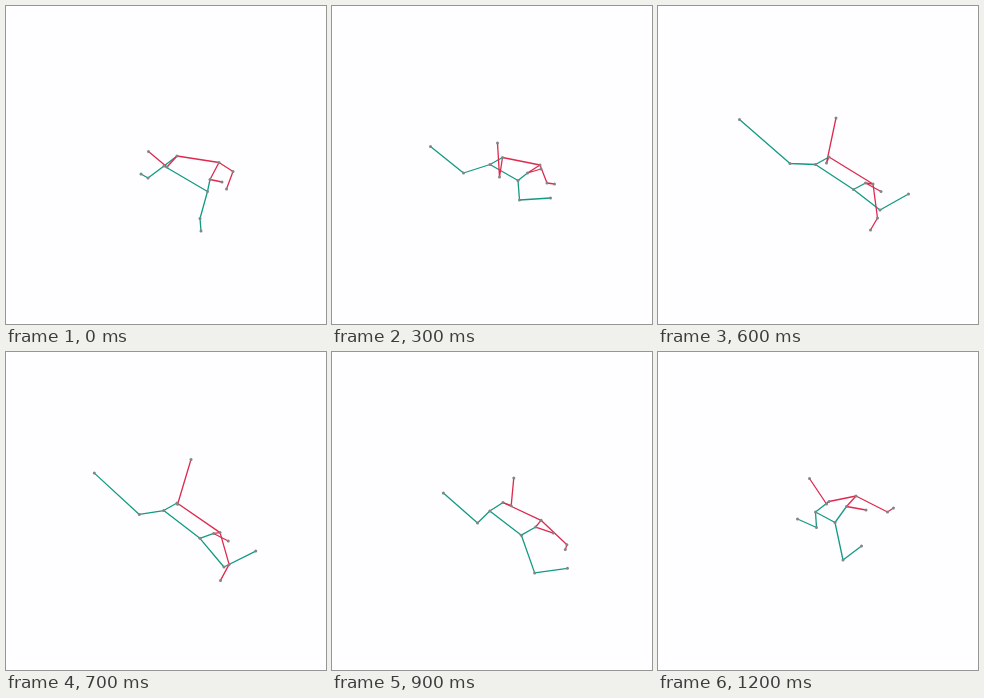
These frames come from a looping animation (320x318 px, 1300 ms). An HTML page with a canvas:

```html
<!DOCTYPE html>
<html>
<head>
<meta charset="utf-8">
<style>
  html, body { margin: 0; width: 100%; height: 100%; overflow: hidden; background: #fefdff; }
  canvas { display: block; }
</style>
</head>
<body>
<canvas width="320" height="318"></canvas>
<script>
const LOOP = 1300, STEP = 100;
const RED = '#de2a4c', GREEN = '#129a82', GRAY = '#858585';
const KEY_TIMES = [0, 300, 500, 600, 800, 1000, 1200];
const ctx = document.querySelector('canvas').getContext('2d');

// Keys are [time, x, y]; an extra key marks a turn between the regular ones.
function path(points, extra) {
  const keys = points.map(([x, y], i) => [KEY_TIMES[i], x, y]);
  if (extra) keys.push(extra);
  return keys.sort((a, b) => a[0] - b[0]);
}

const hipR = path([[171, 150], [170.5, 151.5], [170.5, 151.5], [171, 151], [171, 151], [171, 150], [171, 149.5]]);
const kneeR = path([[161, 161], [167.5, 171], [175, 168], [168.5, 157], [176, 150.5], [180, 157], [168.5, 152]]);
const footR = path([[142.5, 145.5], [165.5, 137], [183.5, 115], [178, 112], [188, 118], [173, 131], [151.5, 126.5]], [700, 185, 107.5]);
const hipL = path([[158, 160], [158, 158.5], [158.5, 157.5], [157.5, 158.5], [158, 158.5], [157.5, 159.5], [157.5, 160]]);
const kneeL = path([[142, 172], [131.5, 167], [135, 156.5], [132, 157.5], [137, 167.5], [154, 173.5], [158.5, 175.5]]);
const footL = path([[135, 168], [98.5, 140.5], [94.5, 120.5], [81.5, 113.5], [99.5, 131.5], [123, 150.5], [139.5, 167]]);
const shoulderR = path([[213, 156.5], [208, 159], [216.5, 166.5], [215, 178], [212.5, 178.5], [205, 156.5], [198, 144]]);
const elbowR = path([[227, 165.5], [215, 177], [213, 190.5], [219.5, 212], [227, 206], [240.5, 178], [229.5, 160]]);
const wristR = path([[220.5, 183], [222.5, 178], [217, 208.5], [212.5, 224], [220, 223.5], [244.5, 170], [235.5, 156]]);
const shoulderL = path([[201.5, 185.5], [186, 174.5], [189.5, 178.5], [195.5, 183.5], [191, 187], [187, 178], [177, 170.5]]);
const elbowL = path([[194, 212.5], [187.5, 194], [206.5, 192], [222, 204], [210, 222.5], [195.5, 216], [185, 208]]);
const wristL = path([[195, 225], [218.5, 192], [237, 183], [250.5, 188], [244.5, 209.5], [224.5, 217.5], [203.5, 194]], [100, 193.5, 228]);
const neck = path([[204, 173.5], [195.5, 167], [205, 174.5], [207.5, 177], [206.5, 183], [199.5, 165], [188.5, 154.5]]);
const head = path([[216, 176], [209, 163], [216, 178.5], [223, 185.5], [220.5, 189], [221, 171], [208, 158]]);

const chains = [
  [GREEN, hipR, hipL, kneeL, footL],
  [GREEN, hipL, shoulderL, elbowL, wristL],
  [GREEN, neck, shoulderL],
  [RED, hipR, kneeR, footR],
  [RED, hipR, shoulderR, elbowR, wristR],
  [RED, shoulderR, neck, head]
];
const joints = [...new Set(chains.flatMap(chain => chain.slice(1)))];

// Cyclic cubic curve through the keys of a path.
function at(keys, t) {
  const n = keys.length;
  const key = i => {
    const [time, x, y] = keys[(i + n) % n];
    return [time + Math.floor(i / n) * LOOP, x, y];
  };
  let i = n - 1;
  while (keys[i][0] > t) i--;
  const [p, a, b, q] = [-1, 0, 1, 2].map(d => key(i + d));
  const span = b[0] - a[0], u = (t - a[0]) / span;
  return [1, 2].map(c => {
    const m = (b[c] - p[c]) / (b[0] - p[0]) * span;
    const k = (q[c] - a[c]) / (q[0] - a[0]) * span;
    const d = b[c] - a[c];
    return a[c] + u * (m + u * (3 * d - 2 * m - k + u * (m + k - 2 * d)));
  });
}

function draw() {
  const t = Math.floor(performance.now() % LOOP / STEP) * STEP;
  ctx.fillStyle = '#fefdff';
  ctx.fillRect(0, 0, 320, 318);
  ctx.lineWidth = 1.3;
  ctx.lineJoin = 'round';
  for (const [color, ...chain] of chains) {
    ctx.strokeStyle = color;
    ctx.beginPath();
    chain.forEach(joint => ctx.lineTo(...at(joint, t)));
    ctx.stroke();
  }
  ctx.fillStyle = GRAY;
  for (const joint of joints) {
    ctx.beginPath();
    ctx.arc(...at(joint, t), 1.5, 0, 2 * Math.PI);
    ctx.fill();
  }
  requestAnimationFrame(draw);
}
draw();
</script>
</body>
</html>
```
